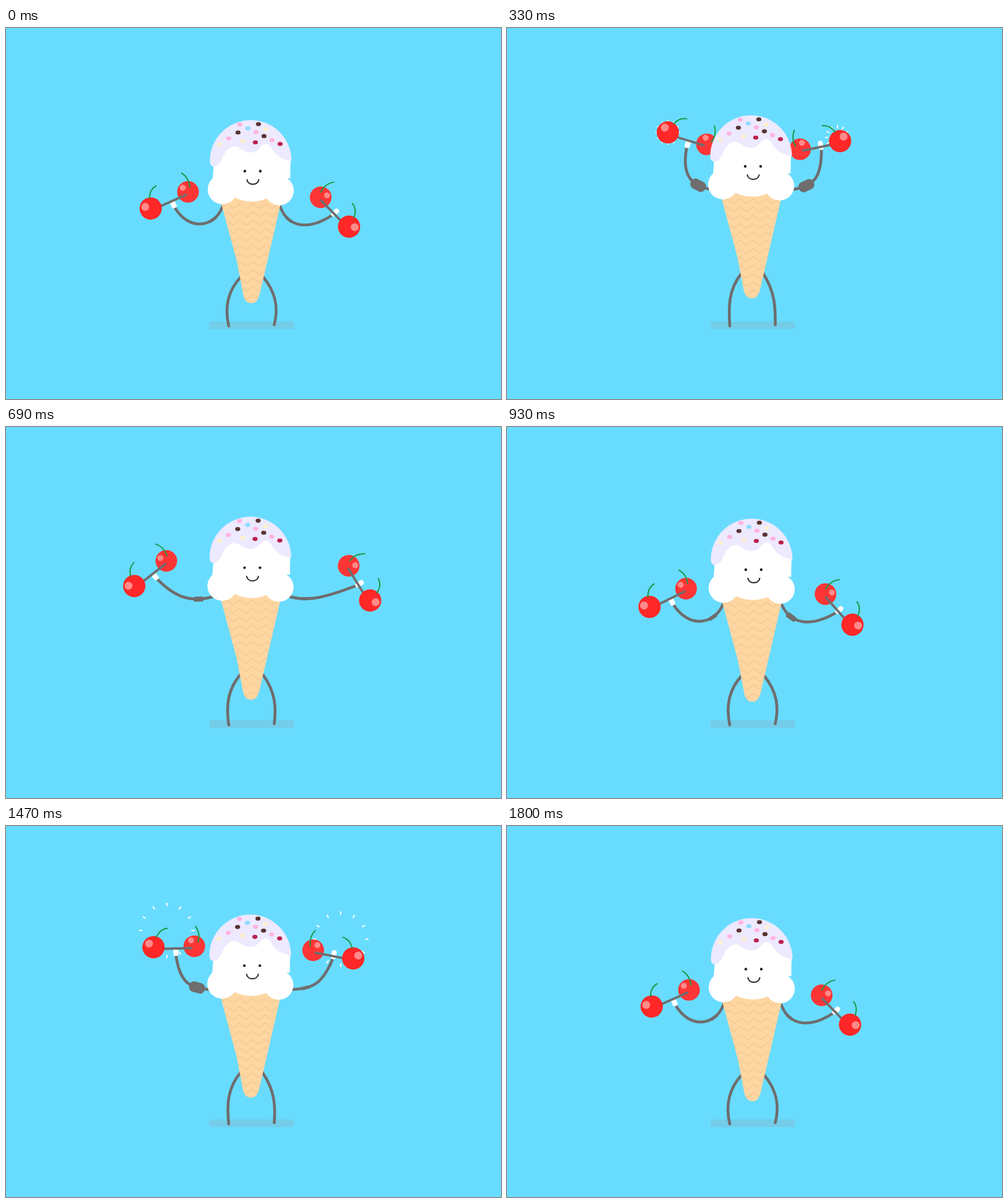
Write an HTML page that moves like this. It is 800 by 600 pixels and loops after 1830 ms.

```html
<!DOCTYPE html>
<html lang="en">
<head>
<meta charset="utf-8">
<title>Ice cream workout</title>
<style>
  html, body { margin: 0; width: 100%; height: 100%; overflow: hidden; background: #68dcff; }
  svg { display: block; width: 800px; height: 600px; }
  .limb { fill: none; stroke: #6f6d6e; stroke-width: 4.6; stroke-linecap: round; }
  .stem { fill: none; stroke: #179a45; stroke-width: 2; stroke-linecap: round; }
  .spark { fill: none; stroke: #fff; stroke-width: 2; }
</style>
</head>
<body>
<svg id="stage" viewBox="0 0 800 600"></svg>
<script>
const LOOP = 1830, STEP = 30, REP = 900, TOP = 330;
const stage = document.getElementById('stage');

// low, high and swing hold the dumbbell's x, y and angle; flex holds when the
// muscle is fully grown, starts to shrink and is gone.
const sides = {
  left: {
    flip: 1, grip: [3, 13], low: [264, 278.5, -24], high: [291.5, 178.5, 17], swing: [-42, 0, -31],
    flex: [330, 570, 730], burst: [[260, 169], [260, 169]],
    hand: '<rect x="-1" y="3" width="8.4" height="12" rx="3" fill="#fff"/>'
  },
  right: {
    flip: -1, grip: [-1, 6], low: [531.5, 297.5, 46], high: [506, 189.5, -11.5], swing: [50, 0, 36],
    flex: [90, 330, 580], burst: [[534, 177], [541, 183]],
    hand: '<rect x="-5" y="-7" width="8" height="15" rx="4" fill="#fff"/>'
  }
};

const circle = (x, y, r, fill) => `<circle cx="${x}" cy="${y}" r="${r}" fill="${fill}"/>`;
const rad = deg => deg * Math.PI / 180;
const mix = (a, b, u) => a + (b - a) * u;
const clamp = u => Math.max(0, Math.min(1, u));
const ramp = (t, from, to) => clamp((t - from) / (to - from));
const smooth = u => u * u * (3 - 2 * u);

function dumbbell(hand) {
  return circle(33, 0, 17.5, '#ff3535') + circle(28, -9.5, 4.8, '#ff8a8a') +
    '<path class="stem" d="M39,-6 Q44,-20 36,-32"/>' + hand +
    '<path class="limb" style="stroke-width:3.8" d="M-20,3 H28.5"/>' +
    circle(-33, 0, 18, '#ff2727') + circle(-40, -6, 6.4, '#ff8a8a') +
    '<path class="stem" d="M-28,-16 Q-22,-29 -10,-30"/>';
}

// A straight row of sprinkles, one for each colour.
const sprinkleRow = (x, y, dx, dy, ...colours) => colours.map((fill, i) =>
  `<ellipse cx="${x + i * dx}" cy="${y + i * dy}" rx="4.1" ry="3.3" fill="${fill}"/>`).join('');

function sprinkles() {
  const pink = '#ffb3df', brown = '#5a3434', cream = '#fff0cf', sky = '#8fdcff', berry = '#b9204f';
  return sprinkleRow(378, 156, 13, 6.3, pink, sky, pink, brown, pink, berry) +
    sprinkleRow(375, 169, -15, 9.5, brown, pink, cream) +
    sprinkleRow(408, 155.5, 12, 8.5, brown, cream) +
    sprinkleRow(383, 183, 20, 2, cream, berry);
}

function waffle() {
  let d = '';
  for (let y = 284; y < 450; y += 13.4) {
    d += `M336,${y}`;
    for (let i = 0; i < 11; i++) d += `l10.5,${i % 2 ? -8 : 8}`;
  }
  return `<path d="${d}" fill="none" stroke="#f5c890" stroke-width="1.4" clip-path="url(#coneClip)"/>`;
}

const cone = 'M348,284 L360,268 H434 L444,284 L412,422 C409,438 405,445 397,445 C388,445 384,438 382.5,426 L373.5,379 Z';
const icing = 'M329.5,215 A66,66 0 0 1 461.5,215 C445,213 437,206 430,196 ' +
  'C424,185 418,185 411,193 C404,203 393,203 383,198 C373,190 367,189 357,198 ' +
  'C349,206 348,224 335,224 Q329.5,223 329.5,215 Z';

const sideMarkup = name => `
  <path id="${name}Arm" class="limb"/>
  <rect id="${name}Muscle" fill="#6f6d6e"/>
  <g id="${name}Bell">${dumbbell(sides[name].hand)}</g>`;

stage.innerHTML = `
  <defs><clipPath id="coneClip"><path d="${cone}"/></clipPath></defs>
  <rect width="800" height="600" fill="#68dcff"/>
  <rect x="328.5" y="474.5" width="137.5" height="12.5" rx="4" fill="#73cde9"/>
  <path id="legs" class="limb"/>
  <path id="leftSparks" class="spark"/>
  <path id="rightSparks" class="spark"/>
  ${sideMarkup('left')}${sideMarkup('right')}
  <g id="body">
    <path d="${cone}" fill="#fed6a2"/>${waffle()}
    ${circle(397.5, 218, 62.5, '#fff')}${circle(350, 261, 24, '#fff')}${circle(441.5, 263, 23.7, '#fff')}
    <path d="M335.5,225 L334,243 H459.5 V225 Z" fill="#fff"/>
    <path d="${icing}" fill="#ede9fe"/>${sprinkles()}
    ${circle(386, 231.5, 2.2, '#222')}${circle(411, 231.5, 2.2, '#222')}
    <path d="M389.5,245.5 C391,255 407,255 408.5,245.5" fill="none" stroke="#222" stroke-width="2" stroke-linecap="round"/>
  </g>`;

function set(id, attrs) {
  const node = document.getElementById(id);
  for (const key in attrs) node.setAttribute(key, attrs[key]);
}

// Height of the body: quick up, slow start down.
function bobAt(t) {
  if (t > TOP) return 1 - ramp(t, TOP, REP) ** 1.5;
  const u = t / TOP;
  return u + u * u - u * u * u;
}

function drawSide(name, t) {
  const { flip, grip, low, high, swing, flex } = sides[name];
  const raise = smooth(ramp(t, 0, TOP)) - smooth(ramp(t, 465, 870));
  const bulge = 5 * raise * (1 - raise) ** 1.35;
  const [x, y, angle] = low.map((from, i) => mix(from, high[i], raise) + swing[i] * bulge);
  set(name + 'Bell', { transform: `translate(${x},${y}) rotate(${angle}) scale(${flip},1)` });

  const cos = Math.cos(rad(angle)), sin = Math.sin(rad(angle));
  const fromBell = (px, py) => [x + flip * px * cos - py * sin, y + flip * px * sin + py * cos];
  const mirror = px => flip > 0 ? px : 793 - px;

  // The upper arm turns about the shoulder, the lower arm stays square to the dumbbell.
  const sx = 349 - 19 * raise - 7 * bulge, sy = 291 - 30 * raise - 4 * bulge;
  const turn = rad(112 + 78 * raise + 20 * bulge);
  const along = r => [mirror(sx + r * Math.cos(turn)), sy + r * Math.sin(turn)];
  const arm = [along(0), along(33), fromBell(8, grip[1] + 47), fromBell(...grip)];
  set(name + 'Arm', { d: `M${along(-14)} L${arm[0]} C${arm.slice(1).join(' ')}` });

  const between = (a, b) => a.map((v, i) => mix(v, b[i], 0.25));
  const reduce = points => points.slice(1).map((p, i) => between(points[i], p));
  const [a, b] = reduce(reduce(arm)), [cx, cy] = between(a, b);
  const tilt = Math.atan2(b[1] - a[1], b[0] - a[0]) * 180 / Math.PI;
  const width = 5 + 12 * (ramp(t, 0, flex[0]) - ramp(t, flex[1], flex[2])), length = width + 9;
  set(name + 'Muscle', {
    x: -length / 2, y: -width / 2, width: length, height: width, rx: width * 0.45,
    transform: `translate(${cx},${cy}) rotate(${tilt})`
  });
}

function drawSparks(name, t, rep) {
  const [x, y] = sides[name].burst[rep];
  const outer = 20 + (t - TOP) * 0.104;
  let d = '';
  if (t >= 300 && t <= 600) {
    for (let angle = 0; angle < 360; angle += 30) {
      const c = Math.cos(rad(angle)), s = Math.sin(rad(angle));
      d += `M${x + (outer - 5.5) * c},${y + (outer - 5.5) * s}L${x + outer * c},${y + outer * s}`;
    }
  }
  set(name + 'Sparks', { d });
}

function draw(ms) {
  const time = Math.floor(ms % LOOP / STEP) * STEP;
  const t = time % REP, rep = time < REP ? 0 : 1, bob = bobAt(t);
  const m = (a, b) => mix(a, b, bob);
  set('body', { transform: `translate(${-bob},${-7.8 * bob})` });
  set('legs', {
    d: `M${m(380, 378)},${m(402, 398)} C${m(358, 358)},${m(425, 424)} ${m(353, 358)},${m(452, 450)} 360,482 ` +
       `M${m(415, 414)},${m(402, 397)} C${m(438, 433)},${m(429, 426)} ${m(440, 434)},${m(455, 452)} 433.5,480`
  });
  for (const name in sides) {
    drawSide(name, t);
    drawSparks(name, t, rep);
  }
}

const start = performance.now();
function tick() {
  draw(performance.now() - start);
  requestAnimationFrame(tick);
}
tick();
</script>
</body>
</html>
```
